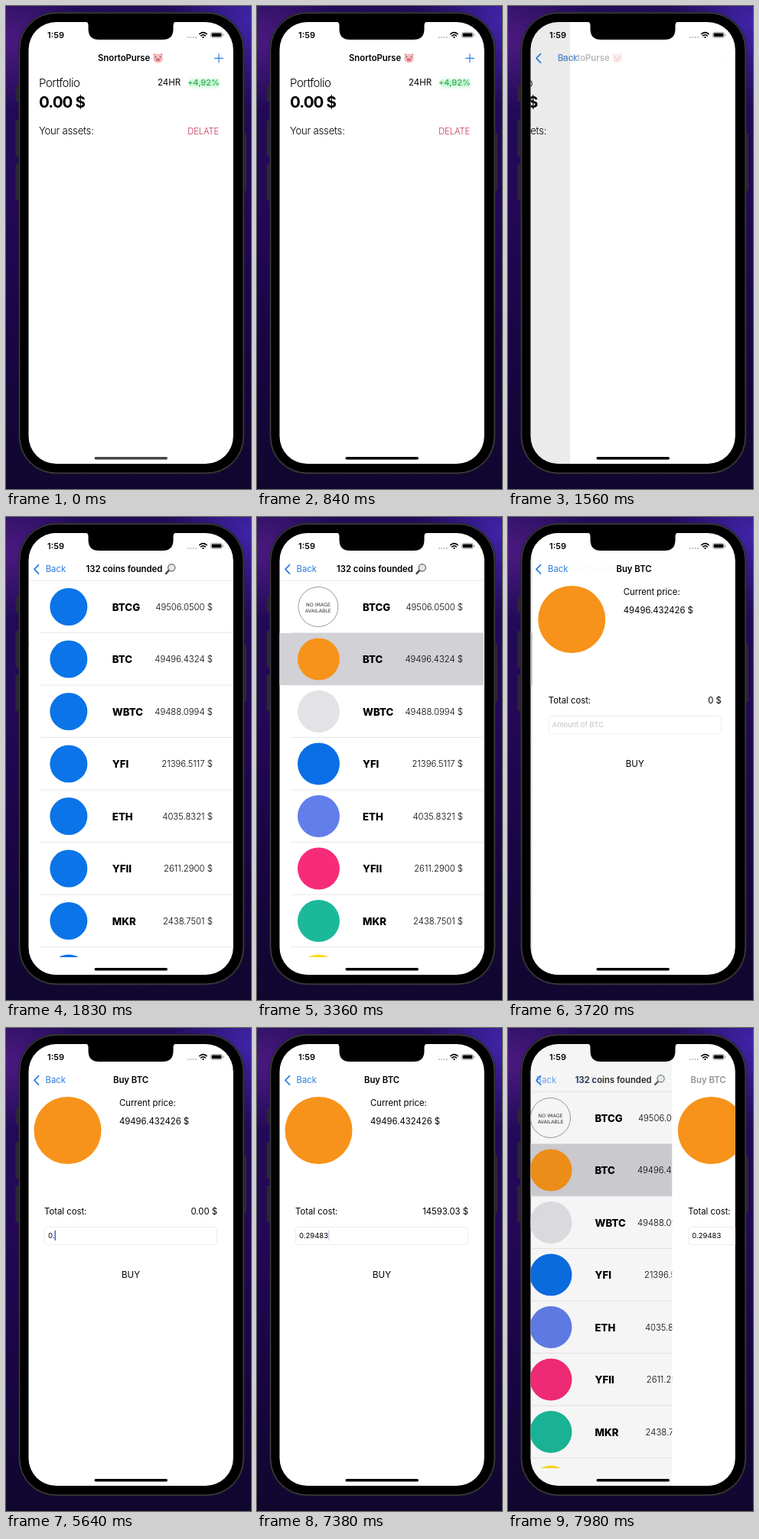
Recreate the animation shown at these times as an HTML page. Size 320 by 632 pixels, loop 8 s.

```html
<!DOCTYPE html>
<html lang="en">
<head>
<meta charset="utf-8">
<title>Coin wallet</title>
<style>
  html, body { margin: 0; width: 100%; height: 100%; overflow: hidden; background: #170739; }
  svg { display: block; width: 320px; height: 632px; }
  text { font-family: Inter, "Open Sans", sans-serif; white-space: pre; }
</style>
</head>
<body>
<svg id="stage" viewBox="0 0 320 632" xmlns="http://www.w3.org/2000/svg"></svg>
<script>
const LOOP = 8000, WIDTH = 267, PARALLAX = 80;
const BLUE = '#2a7de1', ORANGE = '#f7931a', LINE = '#e4e4e6';
const PRICE = 49496.432426;

const coins = [
  ['BTCG', '49506.0500', null, 2280],
  ['BTC', '49496.4324', ORANGE, 2280],
  ['WBTC', '49488.0994', '#e3e3e7', 2280],
  ['YFI', '21396.5117', '#0a6fe6', 2550],
  ['ETH', '4035.8321', '#627eea', 2280],
  ['YFII', '2611.2900', '#f72c78', 2280],
  ['MKR', '2438.7501', '#1bb99a', 2550],
  ['', '', '#ffd91e', 2610]
];

// time, text in the amount field
const typing = [
  [5370, '0'], [5640, '0.'], [5970, '0.2'], [6300, '0.29'],
  [6510, '0.294'], [6690, '0.2948'], [6810, '0.29483']
];

// time, opacity of the caret (linear in between)
const caretKeys = [
  [4739, 0], [4740, 1], [5235, 1], [5355, 0], [5369, 0], [5370, 1],
  [7305, 1], [7410, 0], [7635, 0], [7740, 1], [7845, 1], [7850, 0]
];

const label = (x, y, size, weight, str, attrs = '') =>
  `<text x="${x}" y="${y}" font-size="${size}" font-weight="${weight}" ${attrs}>${str}</text>`;
const dot = (x, y, r, fill, attrs = '') =>
  `<circle cx="${x}" cy="${y}" r="${r}" fill="${fill}" ${attrs}/>`;
const box = (x, y, w, h, fill, attrs = '') =>
  `<rect x="${x}" y="${y}" width="${w}" height="${h}" fill="${fill}" ${attrs}/>`;
const path = (d, color, width) =>
  `<path d="${d}" fill="none" stroke="${color}" stroke-width="${width}" stroke-linecap="round" stroke-linejoin="round"/>`;
const page = (id, body) => `<g id="${id}">${box(29, 20, WIDTH + 2, 580, '#fff')}${body}</g>`;
const END = 'text-anchor="end"', MID = 'text-anchor="middle"';

const backdrop = `
  <defs>
    <linearGradient id="dusk" x2="0" y2="1">
      <stop offset="0" stop-color="#210c58"/><stop offset=".4" stop-color="#240858"/>
      <stop offset=".75" stop-color="#170540"/><stop offset="1" stop-color="#10072e"/>
    </linearGradient>
    <radialGradient id="glowL"><stop stop-color="#4b1a80"/><stop offset="1" stop-color="#4b1a80" stop-opacity="0"/></radialGradient>
    <radialGradient id="glowR"><stop stop-color="#4024a8"/><stop offset="1" stop-color="#4024a8" stop-opacity="0"/></radialGradient>
    <clipPath id="glass"><rect x="29.5" y="21" width="267.3" height="578" rx="36"/></clipPath>
    <filter id="soft" x="-30%" y="-60%" width="160%" height="220%"><feGaussianBlur stdDeviation="2.2"/></filter>
  </defs>
  ${box(0, 0, 320, 632, 'url(#dusk)')}
  <ellipse cx="0" cy="45" rx="110" ry="90" fill="url(#glowL)"/>
  <ellipse cx="320" cy="20" rx="110" ry="110" fill="url(#glowR)"/>`;

const body =
  [[104, 21], [149, 48], [206, 48]].map(([y, h]) => box(12.5, y, 6, h, '#2b2736', 'rx="1.5"')).join('') +
  box(309, 167, 5, 75, '#2b2736', 'rx="1.5"') +
  box(16.3, 7.7, 295.2, 604.8, '#232226', 'rx="49"') +
  box(17.8, 9.2, 292.2, 601.8, '#000', 'rx="47.5" stroke="#4d4b52"');

const home = page('home',
  label(43, 105.5, 15, 300, 'Portfolio', 'letter-spacing="-.45"') +
  label(43, 133, 20.5, 700, '0.00 $', 'letter-spacing="-.9"') +
  label(198, 104, 11.5, 400, '24HR') +
  box(240, 96, 38, 10, '#8df0a8', 'filter="url(#soft)" opacity=".55"') +
  label(279, 104, 11, 500, '+4,92%', `${END} fill="#37a957"`) +
  label(43, 168, 13.2, 300, 'Your assets:', 'letter-spacing="-.25"') +
  label(278, 168, 11, 300, 'DELATE', `${END} fill="#c02a52"`));

const row = ([name, price, color, at], i) => {
  const y = 117.5 + 68.5 * i;
  const icon = color
    ? dot(80.5, y, name ? 27.5 : 24.5, color)
    : dot(80, y, 26, '#fff', 'stroke="#9b9b9b"') +
      ['NO IMAGE', 'AVAILABLE'].map((s, k) => label(80, y - 1 + 8 * k, 6.3, 400, s,
        `${MID} fill="#333" style="font-family:'DejaVu Sans',sans-serif"`)).join('');
  return (i === 1 ? box(29, 152, WIDTH + 2, 68, '#d1d1d6', 'id="picked"') : '') +
    `<g data-before="${at}">${dot(81, y, 24.5, '#0a74e8')}</g><g data-from="${at}">${icon}</g>` +
    label(138, y + 5, 13.2, 800, name) +
    (price && label(269, y + 4.3, 11.3, 300, price + ' $', END)) +
    box(43.5, y + 33.7, 254, .8, LINE);
};
const list = page('list',
  `<g id="rows">${box(30, 82.8, WIDTH, .8, LINE)}
   <svg x="0" y="0" width="320" height="576" viewBox="0 0 320 576">${coins.map(row).join('')}</svg></g>`);

const detail = page('detail',
  dot(80.5, 134, 44, ORANGE) +
  label(148, 101.5, 11.3, 400, 'Current price:') +
  label(148, 125.5, 11.3, 400, PRICE + ' $') +
  label(50, 243.5, 11.3, 400, 'Total cost:') +
  label(276, 243.5, 11.3, 400, '0 $', `${END} id="total"`) +
  box(50.5, 260.5, 225, 23, '#fff', 'rx="3.5" stroke="#ededee"') +
  label(55, 275.3, 9.4, 400, 'Amount of BTC', 'fill="#c2c2c6" id="hint"') +
  label(55, 275.3, 9.5, 400, '', 'id="amount"') +
  box(0, 265, 1.4, 13, '#3a57c8', 'id="caret"') +
  label(163, 327, 11.5, 400, 'BUY', MID));

const pig = `<g transform="translate(198.5 68)">
  <path d="M-6-6l5 2-4 4zM6-6l-5 2 4 4z" fill="#d98a90"/>
  <ellipse cy=".6" rx="6.4" ry="6" fill="#f7bcbe"/>
  <ellipse cy="2.2" rx="3.2" ry="2.3" fill="#e58b95"/>
  ${dot(-1.2, 2.2, .7, '#8d3d4a') + dot(1.2, 2.2, .7, '#8d3d4a') + dot(-3.2, -1.2, .8, '#333') + dot(3.2, -1.2, .8, '#333')}</g>`;
const lens = path('M208.5 74l3.6-4', '#3c3c40', 2.4) + dot(215.8, 66.2, 4.6, '#dfe8ec', 'stroke="#66686b" stroke-width="1.2"');

const bar = `
  <g id="title0">${label(120, 72.3, 11.3, 600, 'SnortoPurse')}${pig}</g>
  <g id="title1">${label(104, 72.3, 11.3, 600, '132 coins founded')}${lens}</g>
  <g id="title2">${label(140, 72.3, 11.3, 600, 'Buy BTC')}</g>
  <g id="back1">${label(51.5, 72.3, 11.3, 400, 'Back', `fill="${BLUE}"`)}</g>
  <g id="back2">${label(51.5, 72.3, 11.3, 400, 'Back', `fill="${BLUE}"`)}</g>
  <g id="chevron">${path('M42.6 62.6l-5.6 5.8 5.6 5.8', BLUE, 1.7)}</g>
  <g id="plus">${path('M278 62.8v11M272.5 68.3h11', BLUE, 1.2)}</g>`;

const status =
  '<path d="M103 20.5q4.5 0 4.5 4.5v5q0 14 14 14h83q14 0 14-14v-5q0-4.5 4.5-4.5z" fill="#000"/>' +
  label(54, 41.8, 11, 600, '1:59') +
  [238, 241.3, 244.6, 247.9].map(x => dot(x, 41, .95, '#b3b3b6')).join('') +
  path('M252.8 36.6q4.7-4 9.4 0', '#000', 1.6) + path('M254.7 38.9q2.8-2.3 5.6 0', '#000', 1.5) + dot(257.5, 40.9, 1.1, '#000') +
  box(267.4, 34.4, 15.2, 7, 'none', 'rx="2.2" stroke="#999" stroke-width=".8"') +
  box(268.6, 35.6, 12.8, 4.6, '#000', 'rx="1.2"') + box(283.5, 36.6, 1, 2.6, '#999', 'rx=".5"') +
  box(115.5, 590, 95.5, 3.4, '#000', 'rx="1.7" id="grip"');

const stage = document.getElementById('stage');
stage.innerHTML = `${backdrop}${body}<g clip-path="url(#glass)">
  ${home}${box(29, 20, WIDTH + 2, 580, '#000', 'id="dim0"')}
  ${list}${box(29, 20, WIDTH + 2, 580, '#000', 'id="dim1"')}
  ${detail}${bar}${status}</g>`;

const $ = id => document.getElementById(id);
const pages = ['home', 'list', 'detail'].map($);
const titleLeft = [120, 104, 140];
const timed = [...stage.querySelectorAll('[data-from],[data-before]')];
const fade = (el, v) => el.setAttribute('opacity', Math.max(0, Math.min(1, v)));
const move = (el, x) => el.setAttribute('transform', `translate(${x.toFixed(3)} 0)`);
const show = (el, on) => el.setAttribute('visibility', on ? 'visible' : 'hidden');

// critically damped spring, 0 to 1
function spring(ms) {
  if (ms <= 0) return 0;
  if (ms > 500) return 1;
  const a = ms * .01826;
  return 1 - (1 + a) * Math.exp(-a);
}

function lerpKeys(keys, t) {
  const i = keys.findIndex(k => k[0] > t);
  if (i < 0) return keys[keys.length - 1][1];
  if (i === 0) return keys[0][1];
  const [t0, a] = keys[i - 1], [t1, b] = keys[i];
  return a + (b - a) * (t - t0) / (t1 - t0);
}

function drawNav(depth) {
  pages.forEach((el, i) => {
    const d = depth - i, away = Math.abs(d);
    show(el, away < 1);
    move(el, d > 0 ? -PARALLAX * d : -WIDTH * d);

    const title = $('title' + i);
    move(title, d > 0 ? -(titleLeft[i] - 51) * d : -142 * d);
    fade(title, 1 - away ** 1.5);

    if (i < 2) fade($('dim' + i), d > 0 && d < 1 ? .09 * d ** .7 : 0);
    if (i > 0) {
      const back = $('back' + i);
      move(back, d > 0 ? -48 * d : -(titleLeft[i - 1] - 51) * d);
      fade(back, 1 - away);
    }
  });
  fade($('chevron'), depth * 1.5);
}

function draw(t) {
  const depth = spring(t - 1395) + spring(t - 3360) - spring(t - 7849);
  drawNav(depth);
  fade($('plus'), (t >= 1350 ? .6 : 1) * Math.max(0, 1 - depth) ** 2);

  const loaded = t >= 1700;
  fade($('rows'), loaded ? 1 : 0);
  if (!loaded) fade($('title1'), 0);
  fade($('picked'), t >= 3360 ? 1 : 0);
  timed.forEach(el => {
    const { from, before } = el.dataset;
    fade(el, (from ? t >= +from : t < +before) ? 1 : 0);
  });

  const typed = typing.filter(k => k[0] <= t).pop();
  const str = typed ? typed[1] : '';
  $('amount').textContent = str;
  fade($('hint'), str ? 0 : 1);
  $('total').textContent = (str ? (parseFloat(str) * PRICE).toFixed(2) : '0') + ' $';
  $('caret').setAttribute('x', 55 + (str ? $('amount').getComputedTextLength() : 0));
  fade($('caret'), lerpKeys(caretKeys, t));

  const grey = Math.round(70 * Math.max(0, 1 - t / 300));
  $('grip').setAttribute('fill', `rgb(${grey},${grey},${grey})`);
}

const start = performance.now();
function tick() {
  draw((performance.now() - start) % LOOP);
  requestAnimationFrame(tick);
}
tick();
</script>
</body>
</html>
```
